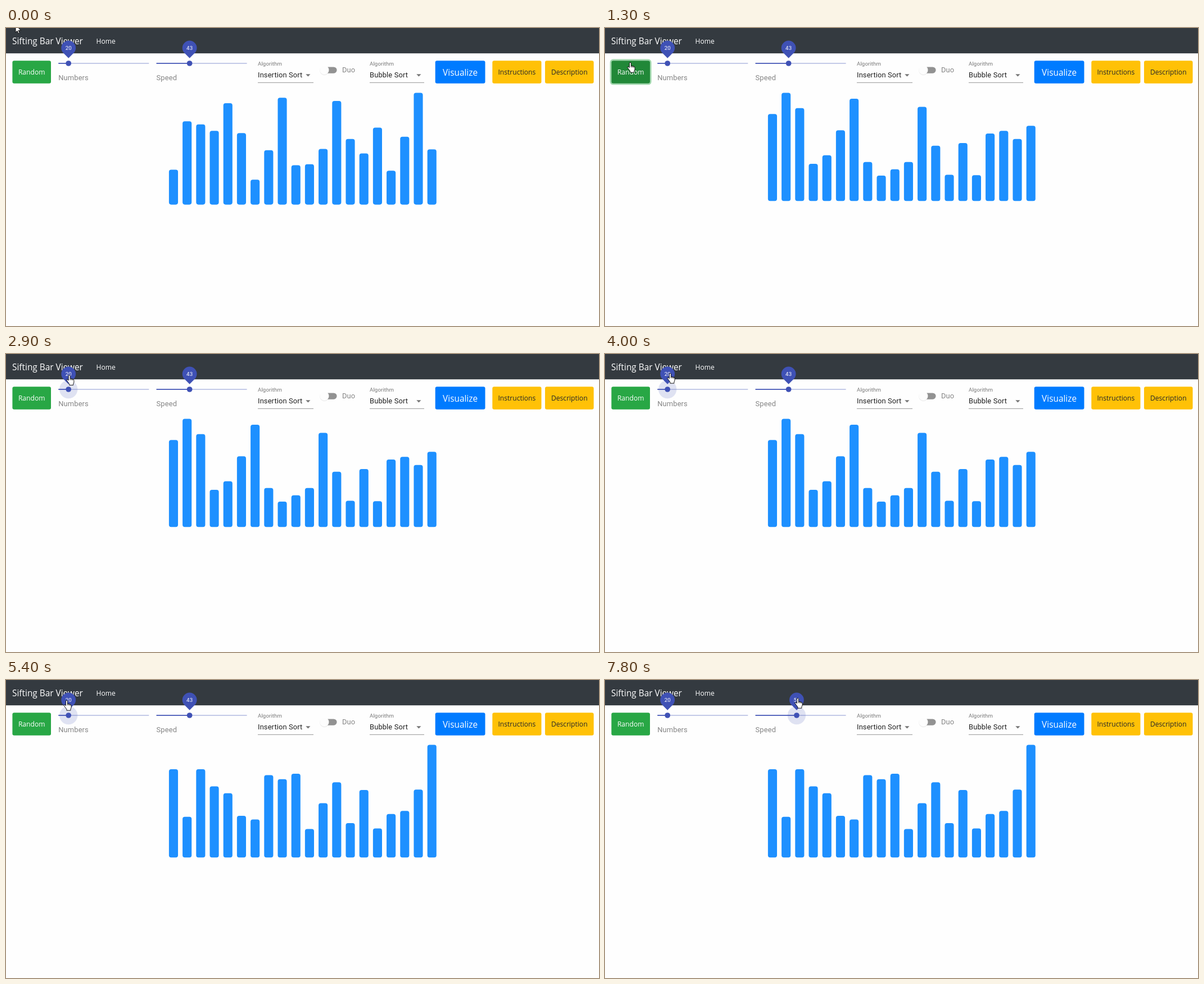
Animation, 1055 px wide and 531 px high, one loop 8000 ms. Source, as an HTML page:

```html
<!DOCTYPE html>
<html lang="en">
<head>
<meta charset="utf-8">
<title>Sifting Bar Viewer</title>
<style>
  html, body { margin: 0; width: 100%; height: 100%; overflow: hidden; background: #fefefe; }
  svg { display: block; width: 100vw; height: 100vh; }
  text { font: 12.9px Roboto, Arial, sans-serif; letter-spacing: .00938em; }
  .ui { font-family: "Open Sans", "Noto Sans", sans-serif; font-size: 12.1px; letter-spacing: 0; }
  .big { font-size: 15.4px; }
  .tiny { font-size: 9.7px; }
  .mid { text-anchor: middle; }
</style>
</head>
<body>
<svg id="stage" viewBox="0 0 1055 531"></svg>
<script>
const LOOP = 8000, STEP = 100, FADE = 150;
const SCALE = .8066;                       // stage pixels per page pixel
const INDIGO = '#3f51b5', GREY = '#858585', INK = '#212121';
const THUMB_R = 6 * SCALE, HOVER_R = 14 * SCALE, PRESS_R = 20 * SCALE;
const RAIL_Y = 63, RAIL_W = 161, BARS_TOP = 115.4;

const stage = document.getElementById('stage');

function set(node, attrs) {
  for (const key in attrs) node.setAttribute(key, attrs[key]);
}
function add(tag, attrs, parent = stage, content = '') {
  const node = document.createElementNS('http://www.w3.org/2000/svg', tag);
  set(node, attrs);
  node.textContent = content;
  parent.appendChild(node);
  return node;
}
function label(x, y, content, fill, cls = '') {
  add('text', { x, y, fill, class: cls }, stage, content);
}
function button(x, width, content, fill, color, cls = '') {
  const box = add('rect', { x, y: 58.2, width, height: 40.5, rx: 4 * SCALE, fill });
  label(x + width / 2, cls ? 84.6 : 83.2, content, color, `ui mid ${cls}`);
  return box;
}
function select(x, width, value) {
  label(x, 67, 'Algorithm', '#757575', 'tiny');
  label(x, 88, value, INK);
  add('rect', { x, y: 96.8, width, height: 1, fill: '#949494' });
  add('path', { d: `M${x + width - 13.7} 82.3h8.2l-4.1 4.1z`, fill: '#757575' });
}

// Sliders run from 10 to 100.
function slider(x, name) {
  const rail = { x, y: RAIL_Y - SCALE, width: RAIL_W, height: 2 * SCALE, fill: INDIGO };
  add('rect', { ...rail, opacity: .38 });
  const filled = add('rect', rail);
  label(x, 93, name, GREY);
  const thumb = add('g', {});
  const halo = add('circle', { fill: INDIGO, opacity: .16 }, thumb);
  add('circle', { r: THUMB_R, fill: INDIGO }, thumb);
  add('path', { d: 'M0-9.2L-9.12-18.38A12.9 12.9 0 1 1 9.12-18.38Z', fill: INDIGO }, thumb);
  const text = add('text', { y: -24, fill: '#fff', class: 'tiny mid' }, thumb);
  return (value, hover, press) => {
    const offset = (value - 10) / 90 * RAIL_W;
    set(filled, { width: offset });
    set(thumb, { transform: `translate(${x + offset} ${RAIL_Y})` });
    set(halo, { r: THUMB_R + (HOVER_R - THUMB_R) * hover + (PRESS_R - HOVER_R) * press });
    text.textContent = value;
  };
}

const lerp = (a, b, k) => a + (b - a) * k;
const ramp = (t, from, to) => Math.min(1, Math.max(0, (t - from) / (to - from)));
const during = (t, on, off) => ramp(t, on, on + FADE) - ramp(t, off, off + FADE);

// The values being sorted, and when each set is shown.
const dataSets = [
  { from: 0, values: [77, 184, 177, 163, 224, 158, 55, 120, 236, 87,
    89, 123, 229, 145, 113, 170, 75, 150, 247, 122] },
  { from: 1300, values: [192, 239, 205, 82, 101, 156, 226, 86, 56, 70,
    86, 208, 122, 58, 128, 57, 149, 155, 137, 166] },
  { from: 5400, values: [195, 90, 195, 157, 142, 92, 84, 182, 173, 185,
    63, 120, 166, 76, 149, 64, 96, 103, 150, 249] }
];

// Each gesture moves the pointer on from where the last one left it.
const gestures = [
  { from: 500, to: 900, x: 45, y: 61 },       // to the Random button
  { from: 1900, to: 2000, x: 79, y: 61.5 },
  { from: 2000, to: 2200, x: 111, y: 39 },    // to the first slider
  { from: 2300, to: 4000, x: 116, y: 34 },
  { from: 4000, to: 4400, x: 91, y: 34 },     // drag down and back
  { from: 4600, to: 4900, x: 108, y: 36 },
  { from: 5900, to: 6200, x: 299, y: 44 },    // to the second slider
  { from: 6400, to: 6800, x: 323, y: 36 },
  { from: 6900, to: 7800, x: 343, y: 32 }     // drag up
];
function pointerAt(t) {
  return gestures.reduce((p, g) => {
    const k = ramp(t, g.from, g.to);
    return { x: lerp(p.x, g.x, k), y: lerp(p.y, g.y, k) };
  }, { x: 17, y: -5.5 });
}

add('rect', { width: 1055, height: 531, fill: '#fefefe' });
add('rect', { width: 1055, height: 56 * SCALE, fill: '#343a40' });
label(11, 28.7, 'Sifting Bar Viewer', '#fff', 'ui big');
label(160.5, 27.6, 'Home', '#fff', 'ui');

const ring = add('rect', { x: 10.1, y: 56.9, width: 71.2, height: 43.1, rx: 4.4,
  fill: 'none', stroke: '#48b461', 'stroke-width': 2.6 });
const randomBox = button(11.4, 68.6, 'Random', '#28a745', '#fff');
const setNumbers = slider(93.3, 'Numbers');
const setSpeed = slider(267.6, 'Speed');
select(448, 99, 'Insertion Sort');
add('rect', { x: 561, y: 69.4, width: 27.6, height: 11.3, rx: 5.65, fill: '#929292' });
add('circle', { cx: 566.5, cy: 75.9, r: 8.2, fill: '#000', opacity: .09 });
add('circle', { cx: 566.5, cy: 75, r: 8.1, fill: '#fdfdfd' });
label(598, 79.3, 'Duo', GREY);
select(647, 97, 'Bubble Sort');
button(763.7, 88.8, 'Visualize', '#007bff', '#fff', 'big');
button(865.3, 87.2, 'Instructions', '#ffc107', '#212529');
button(959, 86.6, 'Description', '#ffc107', '#212529');

const bars = dataSets[0].values.map((_, i) => add('rect',
  { x: 289.9 + i * 30 * SCALE, width: 20 * SCALE, rx: 5 * SCALE, fill: '#1e90ff' }));

const outline = { fill: '#fff', stroke: '#000', 'stroke-width': .9, 'stroke-linejoin': 'round' };
const arrow = add('path', { ...outline, d: 'M0 0V13.4L3 10.6 5 15.2 7.1 14.3 5.1 9.8H9.5Z' });
const hand = add('path', { ...outline,
  d: 'M-1.6 1.9a1.5 1.5 0 0 1 3 0v4.5l2.3.3 2.2.6 1.4.8q.8.6.8 2v3l-1.2 2.8v2.3h-7v-2' +
     'l-2.5-3.5-2.3-3.2q-.4-1.5 1-1.6l1.3.8 1 1zM1.4 6.4v2.8M3.7 6.7v2.6M5.9 7.3v2.4' });

function draw(ms) {
  const t = Math.floor(ms % LOOP / STEP) * STEP;
  const pointer = pointerAt(t);

  const { values } = dataSets.filter(d => t >= d.from).pop();
  const base = BARS_TOP + Math.max(...values) * SCALE;
  bars.forEach((bar, i) => {
    const height = values[i] * SCALE;
    set(bar, { y: base - height, height });
  });

  const dark = during(t, 900, 2700);
  set(randomBox, { fill: `rgb(${lerp(40, 33, dark)} ${lerp(167, 136, dark)} ${lerp(69, 56, dark)})` });
  set(ring, { opacity: during(t, 1100, 2700) * .5 });

  // The numbers slider snaps to tens while it is dragged.
  const dragged = t >= 4000 && t < 5400;
  setNumbers(dragged && pointer.x < 102 ? 10 : 20, during(t, 2300, 5900), during(t, 2700, 5400));
  setSpeed(Math.round(lerp(43, 51, ramp(t, 7100, 7800))), during(t, 6500, LOOP), during(t, 6900, LOOP));

  const isArrow = t < 900 || (t >= 6000 && t < 6600);
  const transform = `translate(${pointer.x} ${pointer.y})`;
  set(arrow, { transform, visibility: isArrow ? 'visible' : 'hidden' });
  set(hand, { transform, visibility: isArrow ? 'hidden' : 'visible' });
}

const start = performance.now();
function tick() {
  draw(performance.now() - start);
  requestAnimationFrame(tick);
}
tick();
</script>
</body>
</html>
```
